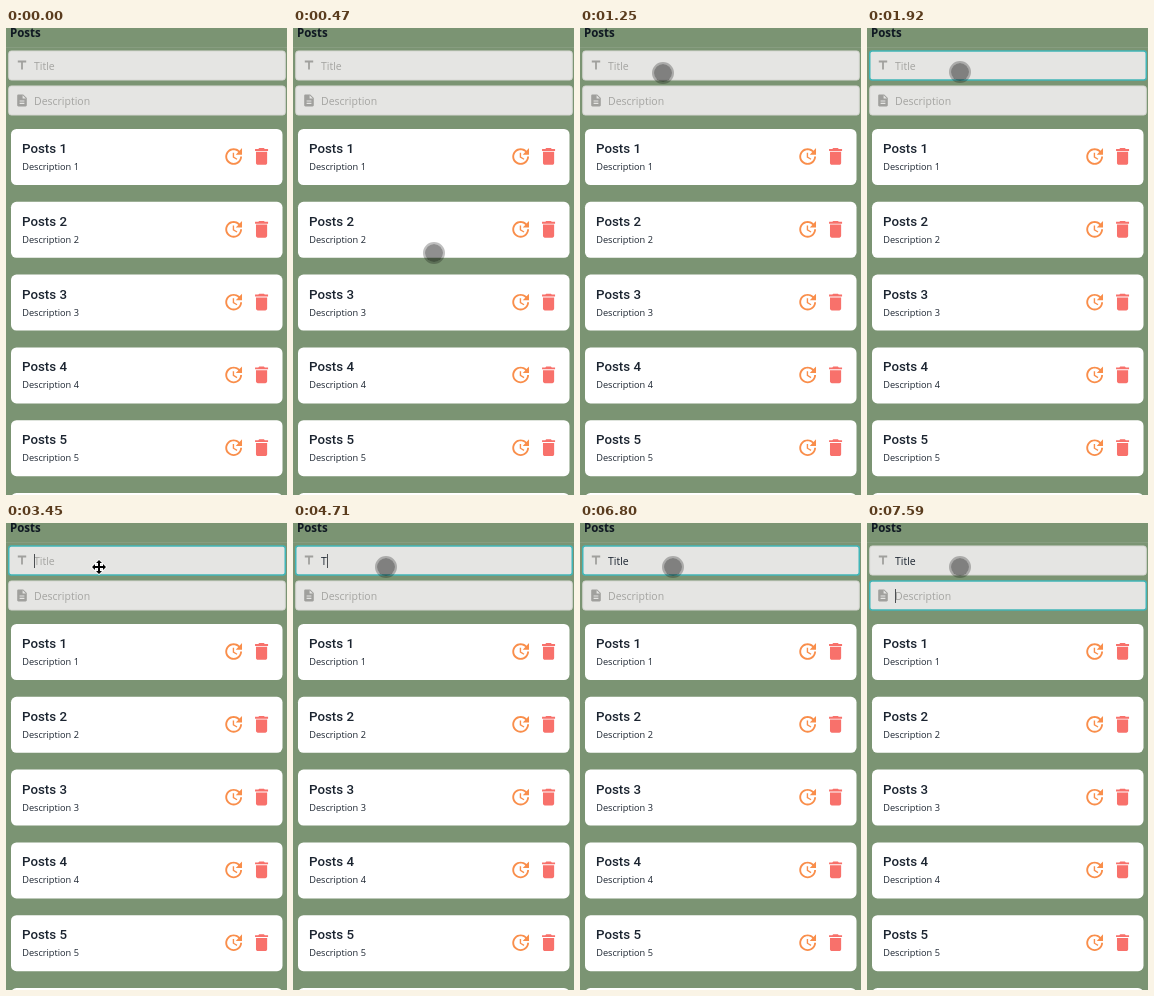
An HTML page for the animation above (8 s loop, 281 by 467 pixels).

```html
<!DOCTYPE html>
<html lang="en">
<head>
<meta charset="utf-8">
<title>Posts</title>
<style>
  html, body { margin: 0; width: 100%; height: 100%; overflow: hidden; background: #7b9473; }
  svg { display: block; width: 281px; height: 467px; }
  text { font-family: "Open Sans", "Noto Sans", sans-serif; fill: #1b2430; white-space: pre; }
  .header { font-size: 11.5px; font-weight: 700; fill: #0f1822; }
  .input { font-size: 10.5px; }
  .hint { fill: #a4a4a1; }
  .name { font: 500 13.3px Roboto, "Liberation Sans", sans-serif; }
  .detail { font-size: 9.2px; }
  .box { fill: #e5e5e3; stroke: #d6d7d2; stroke-width: 1; }
  .box.focus { stroke: #41b6b8; stroke-width: 1.5; }
  .icon { fill: #a0a09d; }
</style>
</head>
<body>
<svg viewBox="0 0 281 467">
  <defs>
    <path id="update" fill="#f98e4b" d="M21 10.12h-6.78l2.74-2.82c-2.73-2.7-7.15-2.8-9.88-.1-2.73 2.71-2.73 7.08 0 9.79s7.15 2.71 9.88 0C18.32 15.65 19 14.08 19 12.1h2c0 1.98-.88 4.55-2.64 6.29-3.51 3.48-9.21 3.48-12.72 0-3.5-3.47-3.53-9.11-.02-12.58s9.14-3.47 12.65 0L21 3zM12.5 8v4.25l3.5 2.08-.72 1.21L11 13V8z"/>
    <path id="trash" fill="#f8716b" d="M6 19c0 1.1.9 2 2 2h8c1.1 0 2-.9 2-2V7H6zM19 4h-3.5l-1-1h-5l-1 1H5v2h14z"/>
  </defs>
  <rect width="281" height="467" fill="#7b9473"/>
  <text class="header" x="4" y="9">Posts</text>
  <rect y="19" width="281" height="1" fill="#879d80"/>

  <rect id="titleBox" class="box" x="2.75" y="23" width="276.5" height="29" rx="2.5"/>
  <path class="icon" transform="translate(8.8 30.2) scale(.6)" d="M5 4v3h5.500v12h3V7H19V4z"/>
  <text id="title" class="input" x="28" y="41.500"></text>

  <rect id="descBox" class="box" x="2.75" y="58" width="276.5" height="29" rx="2.5"/>
  <path class="icon" transform="translate(8.8 65.2) scale(.6)" d="M14 2H6c-1.1 0-2 .9-2 2v16c0 1.1.9 2 2 2h12c1.1 0 2-.9 2-2V8zm2 16H8v-2h8zm0-4H8v-2h8zm-3-5V3.500L18.500 9z"/>
  <text class="input hint" x="28" y="76.500">Description</text>

  <rect id="caret" width="1" height="14" fill="#4c4f52"/>
  <g id="cards"></g>

  <g id="pointer">
    <g id="touch">
      <circle r="9" fill="#000" fill-opacity=".44"/>
      <circle r="10" fill="none" stroke="#000" stroke-opacity=".25" stroke-width="2"/>
    </g>
    <path id="move" fill="#000" stroke="#fff" stroke-width="1.6" paint-order="stroke" stroke-linejoin="round"
      d="M0-7l3 3H1v3h3v-2l3 3-3 3V1H1v3h2L0 7l-3-3h2V1h-3v2l-3-3 3-3v2h3v-3h-2z"/>
  </g>
</svg>
<script>
const LOOP = 8000;
const $ = id => document.getElementById(id);

// Each row: start time, then the values held until the next row.
const path = [
  [0, -50, -50], [330, 168, 283], [400, 160, 266], [470, 141, 225], [530, 126, 186],
  [600, 114, 154], [670, 106, 132], [750, 102, 118], [820, 97, 100], [890, 92, 82],
  [960, 88, 68], [1040, 85, 56], [1110, 83, 49], [1180, 83, 46], [1250, 83, 45],
  [1710, 85, 45], [1780, 88, 44], [1850, 92, 44], [1920, 93, 44]
];
const shape = [[0, "touch"], [3040, "move"], [4710, "touch"]];
const typed = [[0, ""], [4710, "T"], [4850, "Ti"], [4980, "Tit"], [5180, "Titl"], [5330, "Title"], [6320, "Title "]];
const focus = [[0, ""], [1450, "title"], [7460, "desc"]];
const blink = [
  [0, 0], [1450, 1], [1920, 0], [2450, 1], [2910, 0], [3450, 1], [3910, 0],
  [4440, 1], [5790, 0], [6320, 1], [6800, 0], [7260, 1], [7460, 0], [7590, 1]
];
const caretX = [28, 34, 37, 40, 43, 49, 52];

const at = (table, t) => table.findLast(row => row[0] <= t).slice(1);
const show = (el, on) => el.setAttribute("visibility", on ? "visible" : "hidden");

$("cards").innerHTML = Array.from({ length: 6 }, (_, i) => `
  <g transform="translate(0 ${101 + i * 72.8})">
    <rect x="5" width="271.500" height="56" rx="5.500" fill="#fff"/>
    <text class="name" x="16" y="24">Posts ${i + 1}</text>
    <text class="detail" x="16.200" y="41">Description ${i + 1}</text>
    <use href="#update" transform="translate(216.500 16.300) scale(.93)"/>
    <use href="#trash" transform="translate(244.400 16.300) scale(.93)"/>
  </g>`).join("");

function draw(t) {
  const [x, y] = at(path, t);
  const [kind] = at(shape, t);
  const [text] = at(typed, t);
  const [field] = at(focus, t);
  const inDesc = field === "desc";

  $("pointer").setAttribute("transform", `translate(${x} ${y})`);
  show($("touch"), kind === "touch");
  show($("move"), kind === "move");

  $("title").textContent = text || "Title";
  $("title").classList.toggle("hint", !text);
  $("titleBox").classList.toggle("focus", field === "title");
  $("descBox").classList.toggle("focus", inDesc);

  $("caret").setAttribute("x", inDesc ? 28 : caretX[text.length]);
  $("caret").setAttribute("y", inDesc ? 66 : 31);
  show($("caret"), at(blink, t)[0]);
}

const start = performance.now();
function tick() {
  draw((performance.now() - start) % LOOP);
  requestAnimationFrame(tick);
}
tick();
</script>
</body>
</html>
```
